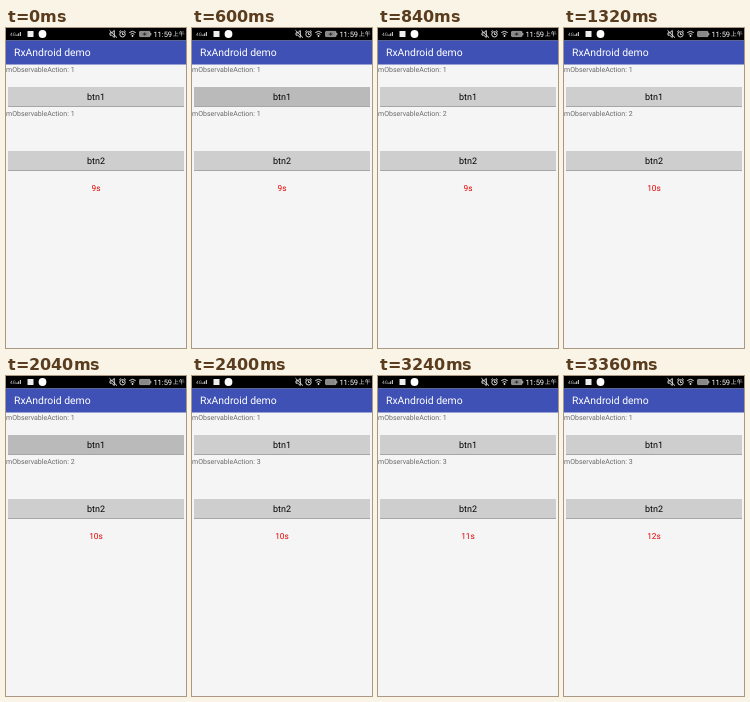
These frames come from a looping animation (180x320 px, 5640 ms). An HTML page:

```html
<!DOCTYPE html>
<html lang="en">
<head>
<meta charset="utf-8">
<title>RxAndroid demo</title>
<style>
  html, body { margin: 0; width: 100%; height: 100%; overflow: hidden; background: #f5f5f5; }
  svg { display: block; width: 100%; height: 100%; }
  text { font-family: Roboto, sans-serif; text-rendering: geometricPrecision; }
  .clock { font-size: 7.5px; fill: #fff; }
  .cjk { font-family: "Noto Sans CJK SC", "Noto Sans CJK", sans-serif; font-size: 6px; fill: #eee; }
  .title { font-size: 10.4px; fill: #fff; }
  .label { font-size: 7px; fill: #6a6a6a; }
  .caption { font-size: 9px; text-anchor: middle; }
  .seconds { font-size: 8.3px; text-anchor: middle; fill: #e80000; }
  .line { fill: none; stroke: #eee; stroke-width: .9; }
</style>
</head>
<body>
<svg viewBox="0 0 180 320" preserveAspectRatio="none">
  <defs>
    <g id="button">
      <rect x="2" y="59" width="176" height="19"/>
      <rect x="2" y="78" width="176" height="1" fill="#a6a6a6"/>
    </g>
  </defs>
  <rect width="180" height="320" fill="#f5f5f5"/>

  <!-- Status bar -->
  <rect width="180" height="12.5" fill="#000"/>
  <text x="4" y="8" font-size="4.7" fill="#ccc">4G</text>
  <path d="M11 8V6.5M12.7 8V5.3M14.4 8V4" class="line"/>
  <rect x="21.5" y="3" width="6" height="6" fill="#eee"/>
  <circle cx="36.5" cy="6" r="3.9" fill="#fff"/>
  <path d="M104 4.8H105.7L108.3 2.5V9.5L105.7 7.2H104ZM103.5 2.3L111 9.7" class="line"/>
  <g class="line">
    <circle cx="116.5" cy="6.3" r="2.7"/>
    <path d="M116.5 4.6V6.5H117.9M113.2 4L114.9 2.5M119.8 4L118.1 2.5"/>
  </g>
  <path d="M123.3 4.6Q126.5 2 129.7 4.6M124.6 6.3Q126.5 4.8 128.4 6.3" class="line"/>
  <circle cx="126.5" cy="8" r=".9" fill="#eee"/>
  <rect x="133.6" y="3.4" width="10.4" height="5.2" rx=".5" fill="#888" stroke="#bbb" stroke-width=".7"/>
  <rect x="144.3" y="5" width="1" height="2.2" fill="#bbb"/>
  <path id="charge" d="M139.5 4L136.3 6.5H138.5L137.8 8L141 5.8H138.8Z" fill="#222"/>
  <text x="147.4" y="8.6" class="clock">11:59</text>
  <text x="166.8" y="8.2" class="cjk">上午</text>

  <!-- App -->
  <rect y="12.5" width="180" height="24" fill="#3f51b5"/>
  <text x="8" y="28.2" class="title">RxAndroid demo</text>
  <text x="0" y="44" class="label">mObservableAction: 1</text>
  <use id="first" href="#button"/>
  <text x="90" y="71.6" class="caption">btn1</text>
  <text id="action" x="0" y="88" class="label"></text>
  <use href="#button" y="64" fill="#cecece"/>
  <text x="90" y="135.6" class="caption">btn2</text>
  <text id="seconds" x="90" y="163.2" class="seconds"></text>
</svg>
<script>
  const LOOP = 5640;
  const part = id => document.getElementById(id);
  const first = part("first"), action = part("action");
  const seconds = part("seconds"), charge = part("charge");
  const between = (t, from, to) => t >= from && t < to;
  const countPassed = (t, times) => times.filter(time => t >= time).length;

  function draw(now) {
    const t = now % LOOP;
    const pressed = between(t, 600, 840) || between(t, 2040, 2400);
    first.setAttribute("fill", pressed ? "#bababa" : "#cecece");
    action.textContent = `mObservableAction: ${1 + countPassed(t, [840, 2400])}`;
    seconds.textContent = `${9 + countPassed(t, [1320, 3240, 3360])}s`;
    charge.style.opacity = t < 1080 || between(t, 3240, 3360) ? 1 : 0;
  }

  const start = performance.now();
  function tick() {
    draw(performance.now() - start);
    requestAnimationFrame(tick);
  }
  tick();
</script>
</body>
</html>
```
